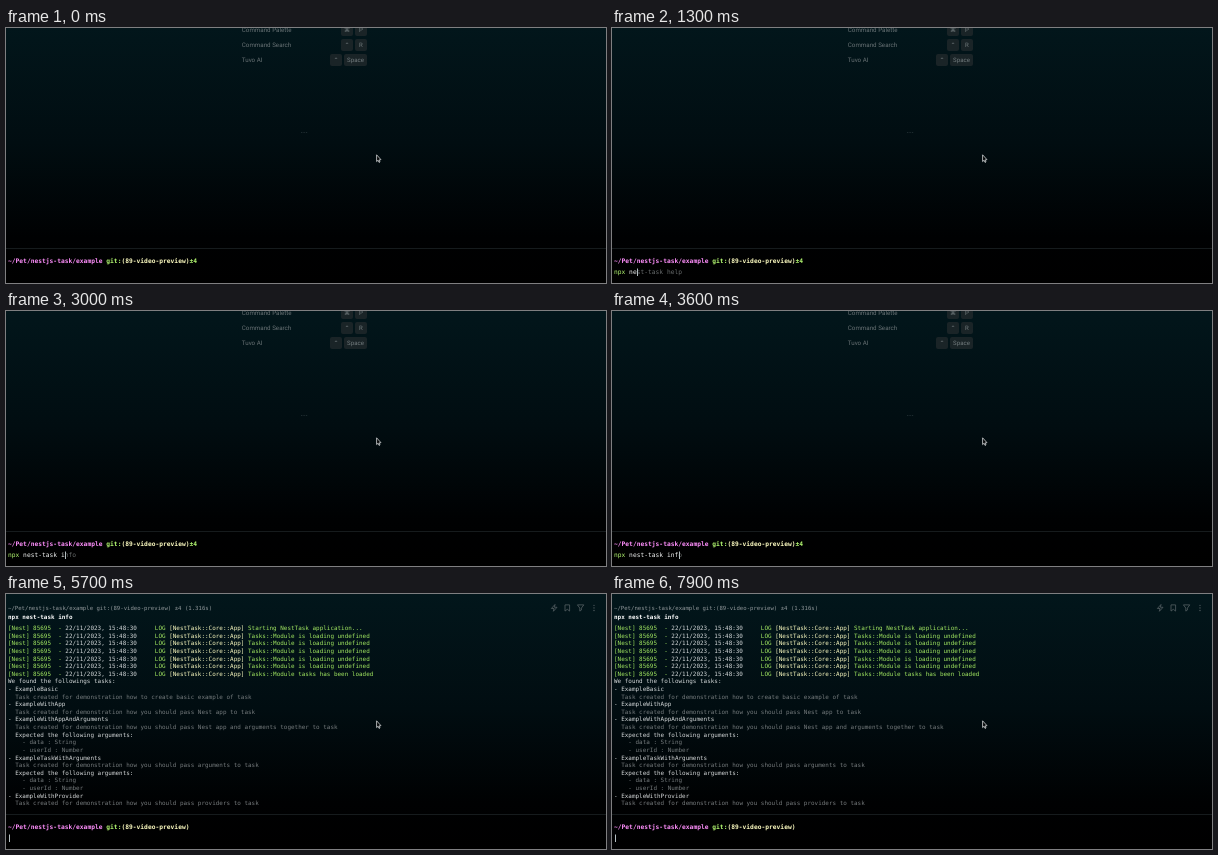
Write an HTML page with a canvas that moves like this. It is 600x255 px and loops after 8 s.

```html
<!DOCTYPE html>
<html lang="en">
<head>
<meta charset="utf-8">
<title>Terminal demo</title>
<style>
html, body { margin: 0; width: 100%; height: 100%; overflow: hidden; background: #000; }
canvas { display: block; width: 600px; height: 255px; }
</style>
</head>
<body>
<canvas id="stage" width="600" height="255"></canvas>
<script>
const ctx = document.getElementById('stage').getContext('2d');
const LOOP = 8000;
const MONO = '"DejaVu Sans Mono", monospace';
const SANS = 'Roboto, "DejaVu Sans", sans-serif';
const C = {
  pink: '#ff8ffd', green: '#b4fa72', cream: '#fefdc2', white: '#f4f6f6', log: '#a4ea62',
  text: '#d6dadb', dim: '#757b7d', ghost: '#686c6d', head: '#90979a', icon: '#566064'
};

const COMMAND = 'npx nest-task info';
const KEYS = [300, 500, 700, 1000, 1200, 1300, 1500, 1600, 1800,
  1900, 2100, 2300, 2500, 2700, 3000, 3300, 3600, 3900];
const POPUP_ON = 400, POPUP_OFF = 1100, ENTER = 4300, DONE = 5700;
const INPUT_SIZE = 6.28, OUT_SIZE = 5.95, ADVANCE = 0.602;
const LINE = 7.609;

const PATH = '~/Pet/nestjs-task/example', BRANCH = '(89-video-preview)';

const log = msg => [
  ['[Nest] 85695  - ', C.log], ['22/11/2023, 15:48:30     ', C.text],
  ['LOG ', C.log], ['[NestTask::Core::App] ', C.cream], [msg, C.log]
];
const plain = s => [[s, C.text]];
const faint = s => [[s, C.dim]];
const task = (name, how, hasArgs) => [
  plain('- ' + name),
  faint('  Task created for demonstration how ' + how + ' task'),
  ...(hasArgs ? [plain('  Expected the following arguments:'),
    faint('    - data : String'), faint('    - userId : Number')] : [])
];
const OUTPUT = [
  log('Starting NestTask application...'),
  ...Array.from({ length: 5 }, () => log('Tasks::Module is loading undefined')),
  log('Tasks::Module tasks has been loaded'),
  plain('We found the followings tasks:'),
  ...task('ExampleBasic', 'to create basic example of'),
  ...task('ExampleWithApp', 'you should pass Nest app to'),
  ...task('ExampleWithAppAndArguments', 'you should pass Nest app and arguments together to', true),
  ...task('ExampleTaskWithArguments', 'you should pass arguments to', true),
  ...task('ExampleWithProvider', 'you should pass providers to')
];

// Drawn through a 1/10 scale so small type keeps fractional advances.
function text(s, x, y, size, color, family = SANS, weight = 400, align = 'left') {
  ctx.save();
  ctx.translate(x, y);
  ctx.scale(0.1, 0.1);
  ctx.font = `${weight} ${size * 10}px ${family}`;
  ctx.textRendering = 'geometricPrecision';
  ctx.textAlign = align;
  ctx.fillStyle = color;
  ctx.fillText(s, 0, 0);
  ctx.restore();
}

function mono(parts, x, y, size) {
  for (const [s, color, weight] of parts) {
    text(s, x, y, size, color, MONO, weight);
    x += s.length * size * ADVANCE;
  }
}

function box(x, y, w, h, r, fill, stroke) {
  ctx.beginPath();
  ctx.roundRect(x, y, w, h, r);
  ctx.fillStyle = fill;
  ctx.fill();
  if (stroke) {
    ctx.strokeStyle = stroke;
    ctx.lineWidth = 0.7;
    ctx.stroke();
  }
}

function poly(points, close) {
  ctx.beginPath();
  points.forEach(([x, y]) => ctx.lineTo(x, y));
  if (close) ctx.closePath();
}

function background() {
  const g = ctx.createLinearGradient(0, 0, 0, 255);
  g.addColorStop(0, '#02161b');
  g.addColorStop(0.45, '#010d11');
  g.addColorStop(0.82, '#000102');
  g.addColorStop(1, '#000');
  ctx.fillStyle = g;
  ctx.fillRect(0, 0, 600, 255);
}

function separator(y) {
  ctx.fillStyle = '#161b1d';
  ctx.fillRect(0, y, 600, 1);
}

function keycap(label, x, y, w) {
  box(x, y - 6, w, 12, 2, '#1a2427');
  text(label, x + w / 2, y + 2.2, 6.1, '#737c7f', SANS, 400, 'center');
}

function welcome() {
  const rows = [
    ['Command Palette', 2, '⌘', 'P'],
    ['Command Search', 17, '⌃', 'R'],
    ['Tuvo AI', 32, '⌃', 'Space']
  ];
  for (const [label, y, mod, key] of rows) {
    const w = key.length > 1 ? 23 : 12;
    text(label, 235.8, y + 2.2, 6.22, '#697275');
    keycap(key, 361 - w, y, w);
    keycap(mod, 347 - w, y, 12);
  }
  ctx.fillStyle = '#1d2a2e';
  for (let i = 0; i < 3; i++) ctx.fillRect(295 + i * 2.4, 104, 1.4, 1);
}

function prompt(status) {
  separator(220);
  mono([[PATH, C.pink, 700], [' git:', C.green, 700], [BRANCH, C.cream, 700],
    [status, C.green, 700]], 2, 234.5, INPUT_SIZE);
}

function caret(n) {
  ctx.fillStyle = '#b4bec1';
  ctx.fillRect(Math.round(2.6 + n * INPUT_SIZE * ADVANCE), 240.5, 1, 7.5);
}

function input(t) {
  const n = KEYS.filter(k => t >= k).length;
  if (n) {
    const hint = n < 15 ? 'npx nest-task help' : COMMAND;
    const typed = COMMAND.slice(0, n);
    mono([[typed.slice(0, 3), n < 3 ? C.white : C.green], [typed.slice(3), C.white],
      [hint.slice(n), C.ghost]], 2, 246.4, INPUT_SIZE);
  }
  if (t >= 100) caret(n);
  if (t >= POPUP_ON && t < POPUP_OFF) popup(n);
}

// Bold the typed letters where they occur in order.
function matched(word, query) {
  let q = 0;
  return [...word].map(ch => {
    const hit = ch === query[q];
    if (hit) q++;
    return [ch, hit ? '#fff' : '#b9c0c3', hit ? 700 : 400];
  });
}

function popup(n) {
  const x = 2.7 + Math.min(n, 3) * INPUT_SIZE * ADVANCE;
  const query = COMMAND.slice(0, Math.min(n, 3));
  const words = ['npx', 'nvm_supports_xz', 'nvm_node_prefix', 'nvm_iojs_prefix',
    'nvm_die_on_prefix', 'nvm_add_iojs_prefix'];

  box(x, 164, 146.5, 76.5, 2, '#20292d', '#41494c');
  ctx.save();
  ctx.beginPath();
  ctx.rect(x, 164.5, 146, 75.5);
  ctx.clip();
  const g = ctx.createLinearGradient(x, 0, x + 141, 0);
  g.addColorStop(0, '#057f80');
  g.addColorStop(0.5, '#3b4684');
  g.addColorStop(1, '#740183');
  ctx.fillStyle = g;
  ctx.fillRect(x + 0.7, 166.5, 140.5, 13);
  words.forEach((word, i) => {
    const y = 173 + i * 12.75;
    box(x + 3, y - 3.3, 6.6, 6.6, 1, '#4d585d');
    text('>_', x + 3.8, y + 1.4, 4, '#a9b2b5', MONO);
    mono(matched(word, query), x + 13.6, y + 2, 5.76);
  });
  text('Execute binaries from npm packages', x + 28.2, 175, 5.84, '#c4d0dc');
  box(x + 142, 166.5, 3.2, 36, 1.5, '#596164');
  ctx.restore();

  box(x + 149, 167, 145, 27.5, 2, '#20292d', '#41494c');
  text('npx', x + 154.2, 178, 6.2, C.white, MONO, 700);
  text('Execute binaries from npm packages', x + 154.5, 188, 5.35, '#adb5b8');
}

function icons(y) {
  ctx.strokeStyle = ctx.fillStyle = C.icon;
  ctx.lineWidth = 0.8;
  ctx.lineJoin = 'round';
  poly([[549, y - 3.4], [545.4, y + 0.6], [548, y + 0.6], [547.4, y + 3.4],
    [551, y - 0.6], [548.4, y - 0.6]], true);
  ctx.stroke();
  poly([[559, y - 3], [563.6, y - 3], [563.6, y + 3.2], [561.3, y + 1.4], [559, y + 3.2]], true);
  ctx.stroke();
  poly([[571.4, y - 3], [577.8, y - 3], [575.4, y + 0.2], [575.4, y + 2.2],
    [573.8, y + 3.2], [573.8, y + 0.2]], true);
  ctx.stroke();
  for (const dy of [-2.6, 0, 2.6]) {
    ctx.beginPath();
    ctx.arc(588, y + dy, 0.65, 0, 7);
    ctx.fill();
  }
}

function block(t) {
  const done = t >= DONE;
  const count = t < 5400 ? 0 : t < 5500 ? 1 : t < 5600 ? 7 : OUTPUT.length;
  const y = 234 - count * LINE - (done ? 35.1 : 0);
  if (!done) separator(Math.round(y - 13.6));
  mono([[PATH + ' git:' + BRANCH + ' ±4' + (done ? ' (1.316s)' : ''), C.head]], 2, y, 5.65);
  mono([[COMMAND, '#fff', 700]], 2, y + 8.5, OUT_SIZE);
  icons(y - 2.4);
  for (let i = 0; i < count; i++) mono(OUTPUT[i], 2, y + 19.9 + i * LINE, OUT_SIZE);
  if (!done) {
    ctx.fillStyle = '#3a3869';
    ctx.fillRect(2.4, 248.4, 3.6, 6.6);
  }
}

function pointer() {
  poly([[370.6, 126.8], [370.6, 133.6], [372.1, 132.2], [373, 134.4], [374, 134],
    [373.1, 131.9], [375, 131.7]], true);
  ctx.fillStyle = '#050708';
  ctx.fill();
  ctx.strokeStyle = '#d5d9da';
  ctx.lineWidth = 0.8;
  ctx.lineJoin = 'round';
  ctx.stroke();
}

function draw(t) {
  background();
  if (t < ENTER) {
    welcome();
    prompt('±4');
    input(t);
  } else {
    block(t);
    if (t >= DONE) {
      prompt('');
      if (Math.floor((t - DONE) / 500) % 2 === 0) caret(0);
    }
  }
  pointer();
}

const start = performance.now();
function frame() {
  draw((performance.now() - start) % LOOP);
  requestAnimationFrame(frame);
}
frame();
</script>
</body>
</html>
```
